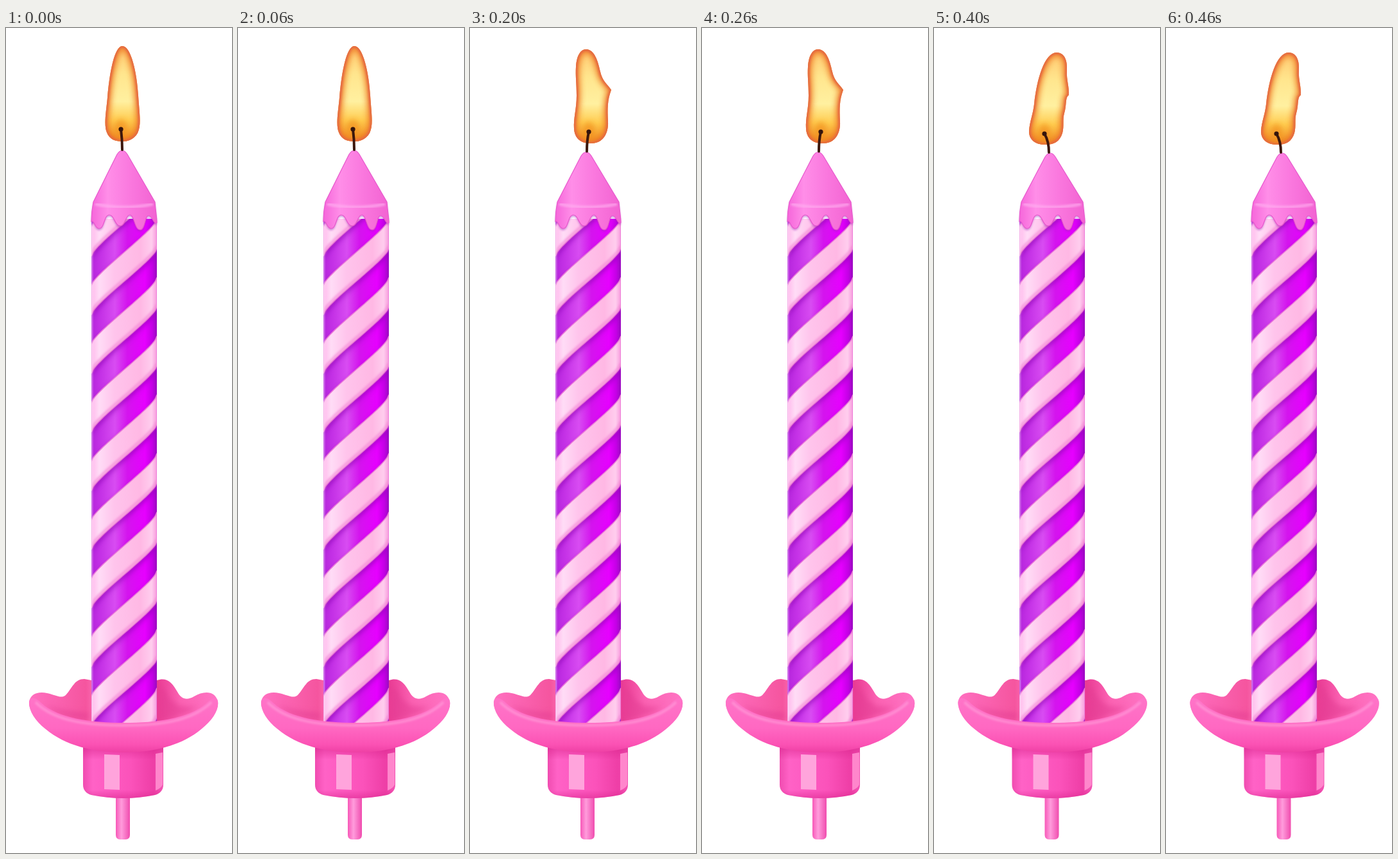
Write an HTML page that moves like this. It is 352 by 1280 pixels and loops after 0.5 s.

```html
<!DOCTYPE html>
<html>
<head>
<meta charset="utf-8">
<title>Birthday candle</title>
<style>
html, body { margin: 0; width: 100%; height: 100%; overflow: hidden; background: #fff; }
svg { display: block; width: 100vw; height: 100vh; }
</style>
</head>
<body>
<svg viewBox="0 0 352 1280" fill="none">
  <defs>
    <linearGradient id="purple">
      <stop offset="0" stop-color="#b526dc"/><stop offset=".14" stop-color="#c431e6"/>
      <stop offset=".36" stop-color="#d84cf2"/><stop offset=".55" stop-color="#d414ee"/>
      <stop offset=".82" stop-color="#e600ff"/><stop offset=".93" stop-color="#c400e6"/>
      <stop offset="1" stop-color="#9a0cc0"/>
    </linearGradient>
    <linearGradient id="light" gradientUnits="userSpaceOnUse" x1="133" x2="235" y1="0" y2="0">
      <stop offset="0" stop-color="#ffb9ec"/><stop offset=".12" stop-color="#ffdcf6"/>
      <stop offset=".35" stop-color="#ffc4ec"/><stop offset=".75" stop-color="#ffb8e4"/>
      <stop offset=".92" stop-color="#ffcdee"/><stop offset="1" stop-color="#f79add"/>
    </linearGradient>
    <linearGradient id="cap">
      <stop offset="0" stop-color="#f566da"/><stop offset=".25" stop-color="#ff8ee8"/>
      <stop offset=".6" stop-color="#fa78de"/><stop offset="1" stop-color="#f263d2"/>
    </linearGradient>
    <linearGradient id="inside">
      <stop offset="0" stop-color="#ff6fc0"/><stop offset=".3" stop-color="#f5559f"/>
      <stop offset=".38" stop-color="#ff76ba"/><stop offset=".62" stop-color="#ff76ba"/>
      <stop offset=".68" stop-color="#e93c94"/><stop offset=".8" stop-color="#fb62b2"/>
      <stop offset="1" stop-color="#ff74c4"/>
    </linearGradient>
    <linearGradient id="bowl" x2="0" y2="1">
      <stop offset="0" stop-color="#ff74c8"/><stop offset=".55" stop-color="#ff68c2"/>
      <stop offset=".85" stop-color="#fb52b4"/><stop offset="1" stop-color="#ee40a4"/>
    </linearGradient>
    <linearGradient id="cup">
      <stop offset="0" stop-color="#f04cb0"/><stop offset=".12" stop-color="#ff62c6"/>
      <stop offset=".6" stop-color="#fb52ba"/><stop offset=".88" stop-color="#ee3ea6"/>
      <stop offset="1" stop-color="#f356b4"/>
    </linearGradient>
    <linearGradient id="shade" x2="0" y2="1">
      <stop offset="0" stop-color="#d8248c" stop-opacity=".75"/>
      <stop offset=".3" stop-color="#d8248c" stop-opacity="0"/>
      <stop offset=".85" stop-color="#d8248c" stop-opacity="0"/>
      <stop offset="1" stop-color="#d8248c" stop-opacity=".5"/>
    </linearGradient>
    <linearGradient id="pin">
      <stop offset="0" stop-color="#f758b8"/><stop offset=".4" stop-color="#ff9cdc"/>
      <stop offset="1" stop-color="#f04cae"/>
    </linearGradient>
    <linearGradient id="fire" x2="0" y2="1">
      <stop offset="0" stop-color="#ffc870"/><stop offset=".3" stop-color="#ffe68e"/>
      <stop offset=".58" stop-color="#fff0a0"/><stop offset=".78" stop-color="#ffcc50"/>
      <stop offset="1" stop-color="#f08a20"/>
    </linearGradient>
    <filter id="soft" x="-50%" y="-50%" width="200%" height="200%"><feGaussianBlur stdDeviation="4"/></filter>
    <filter id="fine" x="-20%" y="-20%" width="140%" height="140%"><feGaussianBlur stdDeviation="1.6"/></filter>
    <clipPath id="bodyClip"><path d="M133 296H235V1078H133Z"/></clipPath>
    <clipPath id="flameClip"><path class="flame"/></clipPath>
  </defs>

  <g class="holder">
    <path fill="url(#pin)" d="M171 1190H193V1252Q193 1259 186 1259H178Q171 1259 171 1252Z"/>
    <path id="cupShape" fill="url(#cup)" d="M120 1110H245V1174Q245 1186 232 1190Q183 1200 133 1190Q120 1186 120 1174Z"/>
    <path fill="url(#shade)" d="M120 1110H245V1174Q245 1186 232 1190Q183 1200 133 1190Q120 1186 120 1174Z"/>
    <path fill="#ffa4dc" d="M153 1127L177 1128V1182L153 1181Z"/>
    <path fill="#ff86cc" d="M233 1126L244 1124V1174Q241 1180 233 1183Z"/>
    <path fill="url(#inside)" d="M36 1047C37 1033 50 1029 64 1032C78 1035 86 1041 93 1035C102 1026 106 1010 122 1010L133 1012H235C252 1006 260 1018 267 1030C273 1041 281 1044 293 1037C308 1028 326 1028 330 1045C332 1062 316 1077 290 1084H75C50 1076 36 1062 36 1047Z"/>
    <path fill="#e23a92" opacity=".55" filter="url(#soft)" d="M62 1050Q82 1070 128 1074V1062Q90 1062 62 1050ZM238 1020Q240 1060 238 1074Q270 1072 300 1052Q260 1060 247 1026Z"/>
  </g>

  <g clip-path="url(#bodyClip)">
    <rect x="133" y="296" width="102" height="784" fill="url(#purple)"/>
    <path class="bands" transform="translate(0 5)" fill="#8a00b4" opacity=".75" filter="url(#soft)"/>
    <path class="bands" fill="url(#light)" stroke="#ea78d8" stroke-width="1.5"/>
    <path id="rims" stroke="#f286d4" stroke-width="5" opacity=".6" filter="url(#fine)"/>
    <path d="M134 296V1078" stroke="#fff" stroke-width="3" opacity=".3"/>
    <path d="M234 296V1078" stroke="#a000b8" stroke-width="4" opacity=".22" filter="url(#fine)"/>
  </g>

  <path class="cap" transform="translate(0 3)" fill="#a020b8" opacity=".45" filter="url(#fine)"/>
  <path class="cap" fill="url(#cap)" stroke="#e858cc" stroke-width="1.2"/>
  <path d="M139 273Q184 283 229 273" stroke="#ffb0f0" stroke-width="5" opacity=".65" filter="url(#fine)"/>

  <g class="holder">
    <path fill="url(#bowl)" d="M36 1045C38 1036 48 1040 56 1048C82 1071 132 1078 184 1078C236 1078 286 1071 312 1048C320 1040 329 1036 330 1045C332 1058 322 1074 304 1088C274 1113 230 1124 184 1124C136 1124 92 1113 62 1088C44 1074 35 1058 36 1045Z"/>
    <path d="M46 1046C76 1077 132 1082 184 1082C236 1082 288 1077 320 1046" stroke="#ff9ad8" stroke-width="4" opacity=".7" filter="url(#fine)"/>
  </g>

  <path class="flame" fill="url(#fire)"/>
  <g clip-path="url(#flameClip)">
    <path class="flame" stroke="#ee7a28" stroke-width="13" opacity=".85" filter="url(#soft)"/>
    <path class="flame" stroke="#e56a42" stroke-width="6" filter="url(#fine)"/>
    <ellipse id="glow" rx="10" ry="15" fill="#f29420" opacity=".75" filter="url(#soft)"/>
  </g>
  <path id="wick" stroke="#3c170c" stroke-width="4" stroke-linecap="round"/>
  <circle id="ember" r="3.6" fill="#34140c"/>
</svg>
<script>
const all = s => document.querySelectorAll(s);
const set = (s, attrs) => all(s).forEach(el => {
  for (const k in attrs) el.setAttribute(k, attrs[k]);
});

// One helical edge around the candle, u from -1 (left) to 1 (right)
const PITCH = 91, WIDTH = 45;
function edge(y, back) {
  const pts = [];
  for (let i = -20; i <= 20; i++) {
    const u = (back ? -i : i) / 20;
    pts.push((184 + 51 * u).toFixed(1) + ' ' + (y - 30 * u - 14 * Math.asin(u)).toFixed(1));
  }
  return pts.join('L');
}
let bands = '', rims = '';
for (let y = 257; y < 1150; y += PITCH) {
  bands += 'M' + edge(y) + 'L' + edge(y + WIDTH, true) + 'Z';
  rims += 'M' + edge(y + WIDTH - 3);
}
set('.bands', { d: bands });
set('#rims', { d: rims });

// top: cone tip, shift: holder offset, wick: base x, tip x, tip y
const poses = [
  { top: 190, shift: 0, wick: [181, 179, 157],
    flame: 'M181 28C195 28 204 70 206 105C208 135 211 150 205 163C199 173 190 176 181 176C171 176 161 173 157 162C152 150 156 130 158 108C161 70 169 28 181 28Z' },
  { top: 192, shift: 0, wick: [181, 176, 160],
    flame: 'M165 33C180 32 191 70 197 105C201 135 206 148 201 163C196 174 187 178 177 178C167 178 155 173 151 160C148 145 149 125 149 105C148 70 150 34 165 33Z' },
  { top: 192.5, shift: 1, wick: [182, 185, 161],
    flame: 'M181 33C194 34 199 50 203 68C206 82 214 87 220 96C214 112 214 125 215 145C216 165 206 179 189 179C173 179 163 172 162 156C161 140 166 125 166 105C166 85 164 75 165 60C166 45 171 33 181 33Z' },
  { top: 193.5, shift: 1.5, wick: [180, 179, 164],
    flame: 'M154 37C168 36 177 48 184 62C191 76 202 84 212 94C207 112 207 125 209 142C212 164 202 181 183 181C165 181 154 172 154 155C154 140 160 125 159 108C158 88 149 72 148 52C147 43 149 38 154 37Z' },
  { top: 194, shift: 1.5, wick: [179, 172, 164],
    flame: 'M191 38C204 38 208 52 207 66C206 80 211 92 210 104C204 108 207 118 203 132C200 142 203 152 200 163C196 176 187 181 174 181C158 181 148 174 148 160C149 145 154 135 156 118C160 80 172 38 191 38Z' }
];

const DRIPS = 'C233 283 235 294 235 302C230 306 228 291 222 291C216 291 217 313 209 313C200 313 200 290 193 290' +
  'C186 290 186 307 178 307C169 307 169 290 161 290C152 290 154 311 145 311C138 311 138 298 133 300C133 290 134 280 136 270';

function pose({ top, shift, wick: [base, x, y], flame }) {
  set('.flame', { d: flame });
  set('.holder', { transform: `translate(${shift} 0)` });
  set('.cap', { d: `M136 270L173 ${top + 6}Q181 ${top - 6} 189 ${top + 6}L232 270${DRIPS}Z` });
  set('#wick', { d: `M${base} ${top - 1}Q${base} ${top - 18} ${x} ${y}` });
  set('#ember', { cx: x, cy: y });
  set('#glow', { cx: x, cy: y });
}

let shown = -1;
function tick(now) {
  const step = Math.floor(now % 500 / 100);
  if (step !== shown) pose(poses[shown = step]);
  requestAnimationFrame(tick);
}
tick(performance.now());
</script>
</body>
</html>
```
